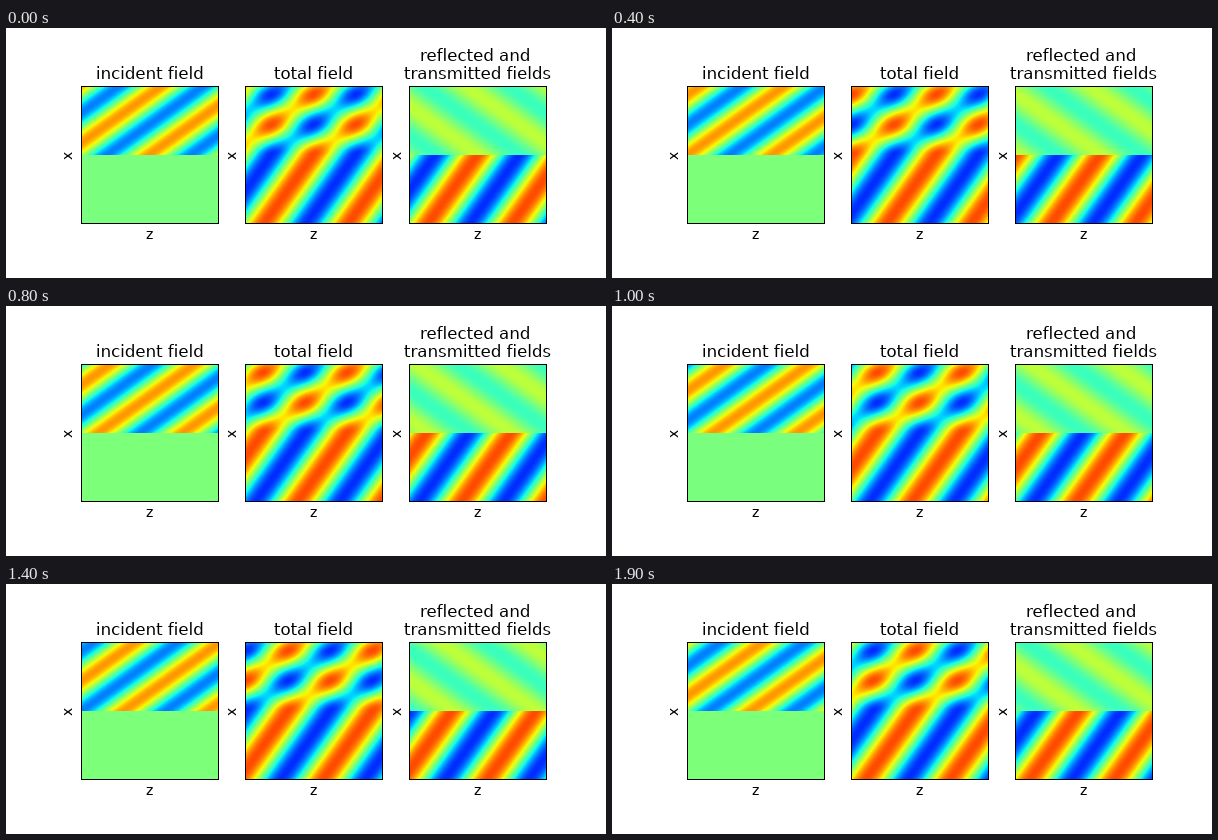
Animation of 600 by 250 pixels, one loop 2 s. Source, as a matplotlib script:

```python
import numpy as np
import matplotlib.pyplot as plt
from matplotlib.animation import FuncAnimation

W, H, DPI = 600, 250, 100
FRAMES, INTERVAL = 20, 100
SIDE, TOP = 137, 58
LEFT, PITCH = 75, 164.12
LEFTS = [LEFT + PITCH * i for i in range(3)]
CENTERS = [left + 68.38 for left in LEFTS]

plt.rcParams["font.family"] = "DejaVu Sans"
plt.rcParams["text.hinting"] = "no_autohint"

# Wave vectors for light leaving the denser medium, in units of 1 / box side
index_ratio = 1.4
angle = np.radians(35.5)
k_out = 4 * np.pi
k_in = index_ratio * k_out
kz = k_in * np.sin(angle)
kx_in = k_in * np.cos(angle)
kx_out = np.sqrt(k_out**2 - kz**2)

# Fresnel amplitudes, s-polarisation
refl = (kx_in - kx_out) / (kx_in + kx_out)
trans = 1 + refl

# One sample per pixel; the middle row belongs to the upper medium
axis = (np.arange(SIDE) - SIDE // 2) / SIDE
z, depth = np.meshgrid(axis, axis)
upper = depth <= 0


def fields(frame):
    phase = kz * z - 2 * np.pi * frame / FRAMES
    incident = np.where(upper, np.cos(phase + kx_in * depth), 0)
    scattered = np.where(
        upper,
        refl * np.cos(phase - kx_in * depth),
        trans * np.cos(phase + kx_out * depth),
    )
    return incident, np.where(upper, incident, 0) + scattered, scattered


fig = plt.figure(figsize=(W / DPI, H / DPI), dpi=DPI, facecolor="white")


def label(x, y, text, size, ha="center", **kw):
    fig.text(x / W, 1 - y / H, text, size=size, ha=ha, va="baseline", **kw)


def panel(left, data):
    ax = fig.add_axes([round(left) / W, 1 - (TOP + SIDE) / H, SIDE / W, SIDE / H])
    ax.set(xticks=[], yticks=[])
    for spine in ax.spines.values():
        spine.set_linewidth(0.72)
    image = ax.imshow(data, cmap="jet", vmin=-2, vmax=2,
                      interpolation="nearest", aspect="auto")
    label(left + 64.3, 211, "z", 10, ha="left")
    label(left - 8, TOP + SIDE / 2, "x", 10, rotation=90, rotation_mode="anchor")
    return image


images = [panel(left, data) for left, data in zip(LEFTS, fields(0))]
label(CENTERS[0], 51, "incident field", 12)
label(CENTERS[1], 51, "total field", 12)
label(CENTERS[2], 33, "reflected and ", 12)
label(CENTERS[2], 51, "transmitted fields", 12)


def update(frame):
    for image, data in zip(images, fields(frame)):
        image.set_data(data)
    return images


def init():
    return update(0)


anim = FuncAnimation(fig, update, frames=FRAMES, init_func=init,
                     interval=INTERVAL, repeat=True, repeat_delay=0)
plt.show()
```
